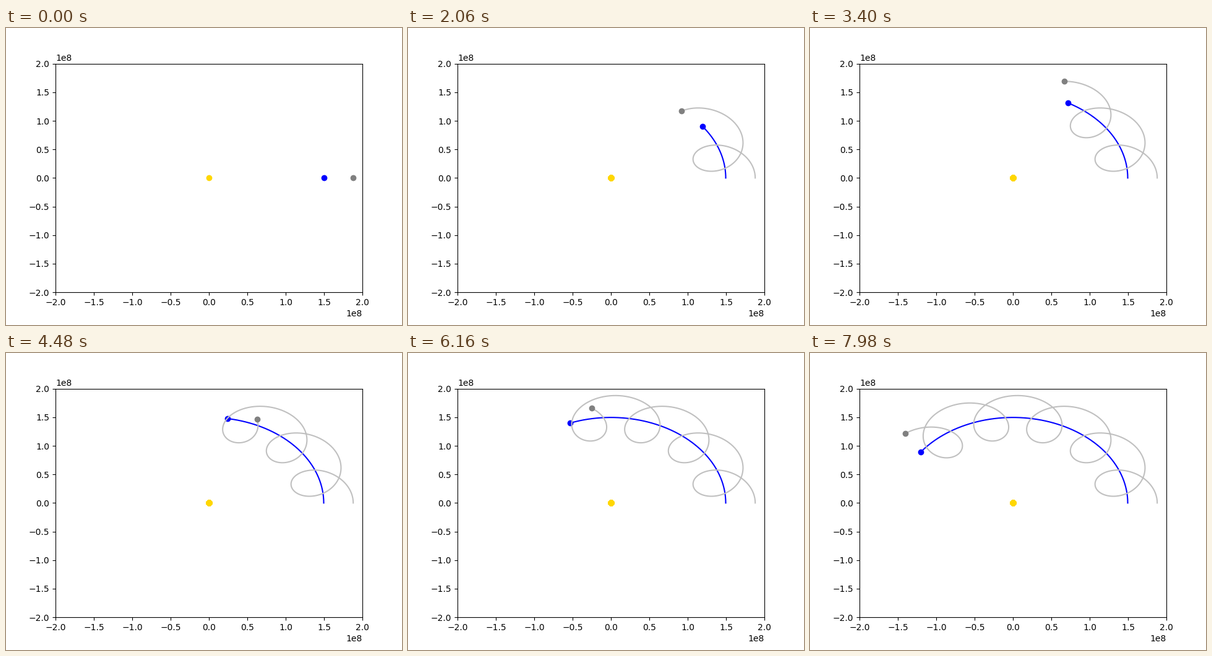
Write a matplotlib script that moves like this. It is 640 by 480 pixels and loops after 8 s.

```python
import numpy as np
import matplotlib.pyplot as plt
from matplotlib.animation import FuncAnimation

FRAMES = 400
INTERVAL = 20            # ms
STEPS_PER_YEAR = 1000
YEAR, MONTH = 365.0, 27.3        # days
EARTH_R = 149.6e6                # km
MOON_R = 38.44e6                 # lunar distance, enlarged 100 times
LIMIT = 2e8


def circle(radius, angle):
    return radius * np.array([np.cos(angle), np.sin(angle)])


year_angle = 2 * np.pi * np.arange(FRAMES) / STEPS_PER_YEAR
earth = circle(EARTH_R, year_angle)
moon = earth + circle(MOON_R, year_angle * YEAR / MONTH)

fig, ax = plt.subplots(figsize=(6.4, 4.8), dpi=100)
ax.set_xlim(-LIMIT, LIMIT)
ax.set_ylim(-LIMIT, LIMIT)


def make_body(color, trail_color):
    trail, = ax.plot([], [], color=trail_color, lw=1.5)
    dot, = ax.plot([], [], "o", color=color)
    return trail, dot


sun, = ax.plot([], [], "o", color="gold")
bodies = [
    (earth, *make_body("blue", "blue")),
    (moon, *make_body("gray", "silver")),
]


def update(n):
    # the sun is stamped once more per step, so its soft edge fills in
    stamps = np.zeros(n + 1)
    sun.set_data(stamps, stamps)
    for path, trail, dot in bodies:
        trail.set_data(path[:, :n + 1])
        dot.set_data(path[:, n:n + 1])
    return [sun] + [artist for body in bodies for artist in body[1:]]


def reset():
    return update(0)


anim = FuncAnimation(fig, update, frames=FRAMES, init_func=reset,
                     interval=INTERVAL, repeat=True, repeat_delay=0)
plt.show()
```
